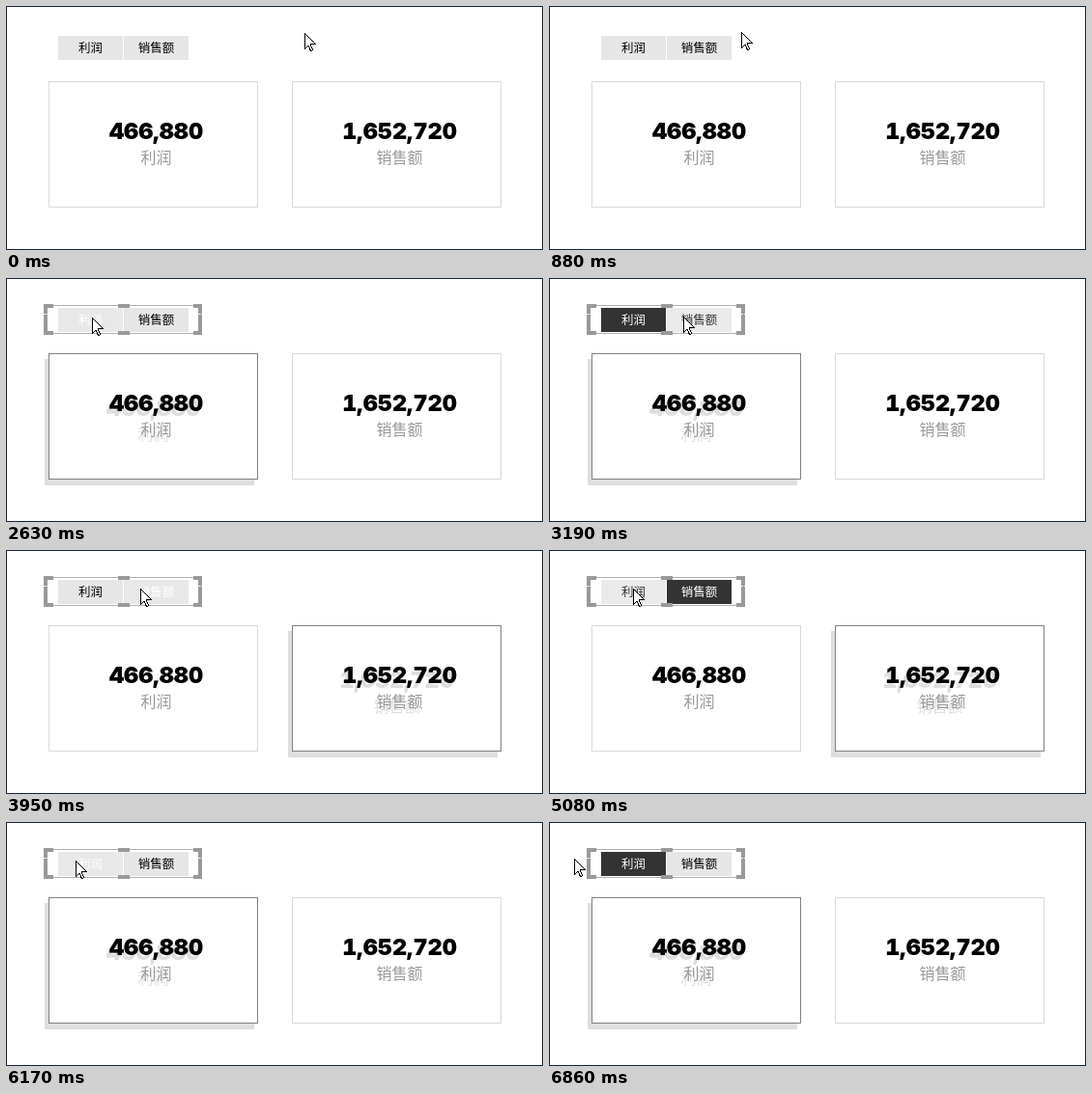
Animation of 556 by 253 pixels, one loop 7.59 s. Source, as an HTML page:

```html
<!DOCTYPE html>
<html lang="zh">
<head>
<meta charset="utf-8">
<style>
  html, body { margin: 0; width: 100%; height: 100%; overflow: hidden; background: #fff; }
  svg { display: block; width: 556px; height: 253px; }
  text { text-anchor: middle; font-family: "Noto Sans CJK SC", "Noto Sans CJK", sans-serif; }
  .button rect { fill: #e6e6e6; }
  .button text { font-size: 12.5px; }
  .button.hover rect { fill: #eaeaea; }
  .button.hover text { fill: #333; }
  .button.on rect { fill: #333; }
  .button.on.hover rect { fill: #e8e8e8; }
  .button.on text { fill: #fff; }
  .card .box { fill: #fff; stroke: #d9d9d9; }
  .card .shadow { fill: #dedede; visibility: hidden; }
  .card .value { font: 900 23.5px Inter, "Arial Black", sans-serif; font-variant-numeric: tabular-nums; }
  .card .label { font-size: 16px; fill: #999; }
  .card.on .box { stroke: #7c8583; }
  .card.on .shadow { visibility: visible; }
  .card.on .texts { filter: drop-shadow(-3px 5px 0 #dedede); }
</style>
</head>
<body>
<svg viewBox="0 0 556 253">
  <rect x=".5" y=".5" width="555" height="252" fill="none" stroke="#10263f"/>
  <g id="scene"></g>
  <g id="frame" fill="none" stroke="#999">
    <rect x="41.5" y="28.5" width="160" height="29" stroke="#b0b0b0"/>
    <path stroke-width="4" d="M41 27V37M41 38V59M201 27V37M201 38V59
      M39 29H49M116 29H128M194 29H203M39 57H49M116 57H128M194 57H203"/>
  </g>
  <path id="cursor" d="M.5 .5V16.5L4 13.2 6.5 18.5H7.5L8.5 17 6.5 12.5V11.5H11.5Z"
    fill="#fff" stroke="#000" shape-rendering="crispEdges"/>
</svg>
<script>
const LOOP = 7590, STEP = 70;
const $ = id => document.getElementById(id);

// Cursor moves: start, end, number of steps, from, control point, to
const moves = [
  [530, 1220, 10, [309, 28], [200, 19], [87, 42]],
  [2630, 3190, 9, [87, 42], [112, 21], [139, 40]],
  [4870, 5080, 4, [139, 40], [113, 40], [87, 40]],
  [5150, 5150, 1, [87, 40], [86, 37], [84, 34]],
  [5350, 5480, 2, [84, 34], [76, 25], [72, 34]],
  [5680, 6100, 7, [72, 34], [72, 37], [72, 40]],
  [6450, 6860, 6, [72, 40], [48, 40], [26, 38]],
];
// Clicks: time, selected item
const clicks = [[1480, 0], [3530, 1], [5680, 0]];
const REFRESH = 280;

const items = [
  { label: '利润', value: '466,880', buttonX: 54, cardX: 44 },
  { label: '销售额', value: '1,652,720', buttonX: 122, cardX: 296 },
];

$('scene').innerHTML = items.map(({ label, value, buttonX, cardX }) => `
  <g class="button">
    <rect x="${buttonX}" y="31" width="67" height="25"/>
    <text x="${buttonX + 33.5}" y="48">${label}</text>
  </g>
  <g class="card">
    <rect class="shadow" x="${cardX - 4}" y="84" width="217" height="131"/>
    <rect class="box" x="${cardX + .5}" y="78.5" width="216" height="130"/>
    <g class="texts">
      <text class="value" x="${cardX + 111.5}" y="138">${value}</text>
      <text class="label" x="${cardX + 111.5}" y="163">${label}</text>
    </g>
    <g class="spinner" fill="#333">
      ${[180, 225, 270].map(a => `<circle r="1" cx="4" transform="translate(${cardX + 12} 93) rotate(${a})"/>`).join('')}
    </g>
  </g>`).join('');

const buttons = document.querySelectorAll('.button');
const cards = document.querySelectorAll('.card');
const spinners = document.querySelectorAll('.spinner');

function cursorAt(t) {
  const move = moves.findLast(m => t >= m[0]);
  if (!move) return moves[0][3];
  const [start, end, steps, from, mid, to] = move;
  const gap = (end - start) / (steps - 1) || STEP;
  const p = Math.min(1, (Math.floor((t - start) / gap + 1e-6) + 1) / steps);
  const s = p * p * (3 - 2 * p);
  return from.map((a, i) => a * (1 - s) ** 2 + 2 * mid[i] * s * (1 - s) + to[i] * s * s);
}

const lastClick = t => clicks.findLast(c => t >= c[0]) || [-Infinity, -1];

function draw(t) {
  const [x, y] = cursorAt(t).map(Math.round);
  $('cursor').setAttribute('transform', `translate(${x} ${y})`);

  const over = x > 40 && x < 203 && y > 27 && y < 60;
  $('frame').style.opacity = t >= clicks[0][0] ? 1 : over ? .6 : 0;

  const [clickTime, chosen] = lastClick(t);
  const [, shown] = lastClick(t - REFRESH);
  const loading = t - clickTime < REFRESH;
  const turn = loading ? Math.floor((t - clickTime) / STEP) * 45 : 0;

  items.forEach(({ buttonX, cardX }, i) => {
    const hover = x >= buttonX && x < buttonX + 67 && y >= 31 && y < 56;
    buttons[i].classList.toggle('hover', hover);
    buttons[i].classList.toggle('on', i === chosen);
    cards[i].classList.toggle('on', i === shown);
    spinners[i].style.display = loading ? '' : 'none';
    spinners[i].setAttribute('transform', `rotate(${turn} ${cardX + 12} 93)`);
  });
}

function tick() {
  draw(performance.now() % LOOP);
  requestAnimationFrame(tick);
}
tick();
</script>
</body>
</html>
```
